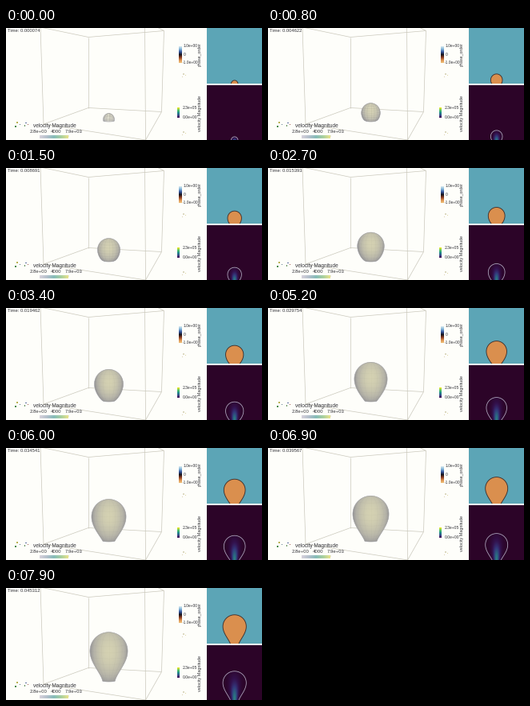
A matplotlib script that plays this animation: 320x141 px, repeating every 8 s.

```python
import numpy as np
import matplotlib.pyplot as plt
from matplotlib.animation import FuncAnimation
from matplotlib.colors import LinearSegmentedColormap
from matplotlib.patches import Polygon, Rectangle

W, H, DPI = 320, 141, 64
FRAMES, STEP_MS = 80, 100
PT = 72 / DPI

PAPER, INK, EDGE = "#fefefa", "#34343a", "#cac8bc"
TEAL, ORANGE, DARK = "#5ca5b6", "#da8f4e", "#2c0428"

plt.rcParams["font.family"] = "Liberation Sans"
fig = plt.figure(figsize=(W / DPI, H / DPI), dpi=DPI, facecolor=PAPER)
ax = fig.add_axes([0, 0, 1, 1])
ax.axis("off")


def cmap(*colors):
    return LinearSegmentedColormap.from_list("ramp", colors)


PHASE = cmap("#f0c27c", ORANGE, "#8a3a20", "#15151c", "#34529a", "#7fb4d8", "#d5e6ee")
SPEED = cmap("#440154", "#3b528b", "#21918c", "#5ec962", "#fde725")
MAGNITUDE = cmap("#d6d2dc", "#b4c0cc", "#86bcba", "#a8d0a0", "#e8e28c")
FLOW = cmap(DARK, "#33124e", "#34367a", "#2b6a82", "#2f9c84", "#7ecb68")
SKIN = cmap("#85858e", "#b5b3a8", "#d4d1b2")


def text(x, y, s, px, **kw):
    opts = dict(color=INK, ha="left", va="center") | kw
    return ax.text(x, y, s, fontsize=px * PT, zorder=9, **opts)


def line(xs, ys, color, px=0.7, **kw):
    return ax.plot(xs, ys, color=color, lw=px * PT, solid_capstyle="butt", **kw)[0]


def bar(x0, x1, y0, y1, ramp, vertical=True):
    g = np.linspace(0, 1, 64)
    g = g[::-1, None] if vertical else g[None, :]
    ax.imshow(g, cmap=ramp, extent=(x0, x1, y1, y0), aspect="auto", zorder=3)


def triad(x, y, r, colors):
    for (dx, dy), c in zip(((1, -0.3), (-0.6, 0.4), (0, -1)), colors):
        ax.add_patch(Rectangle((x + r * dx - 0.6, y + r * dy - 0.6), 1.2, 1.2, fc=c, lw=0))


# Domain box corners: left, back, right, front
top = [(43, -1), (103, 11.5), (197.5, 3.5), (173.5, -9)]
base = [(47, 121), (103, 100.5), (194.5, 105.5), (174.5, 141)]
for k in range(4):
    n = (k + 1) % 4
    for a, b in ((top[k], top[n]), (base[k], base[n]), (top[k], base[k])):
        line([a[0], b[0]], [a[1], b[1]], EDGE, zorder=1)

# Legends
text(34, 123.3, "velocity Magnitude", 6.5)
for x, label in ((30, "2.8e+00"), (56, "4000"), (73.5, "7.9e+03")):
    text(x, 130, label, 6)
bar(42, 78, 135.5, 139, MAGNITUDE, vertical=False)
for x in np.linspace(44, 78, 9):
    line([x, x], [134.5, 135.5], "#a0a090", 0.5)

bar(215.5, 219, 23, 44, PHASE)
text(222, 23, "1.0e+00", 4.9)
text(221.5, 33.3, "0", 4.9)
text(220.5, 43.8, "-1.0e+00", 4.9)
text(242.5, 33, "phase_order", 5.3, rotation=90, ha="center")

bar(214, 217, 100, 113, SPEED)
text(220.5, 100.3, "2.3e+05", 5)
text(220.5, 112.8, "0.0e+00", 5)
text(242.5, 107, "velocity Magnitude", 5.4, rotation=90, ha="center")

for y in (60.5, 133.5):
    triad(222, y, 2.5, ("#e0d9a0", "#dcd0b0", "#dcd8c0"))
triad(14, 122.5, 3.5, ("#5a7a8a", "#4a8a4a", "#b9b050"))
triad(25, 122, 2.5, ("#a05a50", "#5a8a50", "#6070a0"))

# Slice panels
PANELS = ((251, 0, 69, 70), (251, 72, 69, 69))
for (x, y, w, h), color in zip(PANELS, (TEAL, DARK)):
    ax.add_patch(Rectangle((x, y), w, h, fc=color, lw=0, zorder=2))
gx, gy = np.meshgrid(np.arange(251.25, 320, 0.5), np.arange(72.25, 141, 0.5))
flow = ax.imshow(np.zeros_like(gx), cmap=FLOW, vmin=0, vmax=1,
                 extent=(251, 320, 141, 72), aspect="auto", zorder=3)

clock = text(1.5, 3.7, "", 5.85)


def shape(i):
    """Height, half width, foot half width, belly height and taper power."""
    start = np.exp(-i / 4)
    w = np.cbrt(343 + 161 * i)
    h = w * (1.91 + 0.0088 * i - 0.55 * start)
    foot = 8 - 2.5 * np.exp(-i / 30) + 1.3 * start
    mid = h * (0.48 + 0.0017 * i - 0.3 * start)
    power = 0.5 + 0.9 * (i / 79) ** 1.5
    return h, w, foot, mid, power


def width_at(z, h, w, foot, mid, power):
    s = np.clip(z / mid, 0, 1)
    u = np.clip((z - mid) / (h - mid), 0, 1)
    lower = foot + (w - foot) * np.sin(np.pi * s / 2) ** power
    return np.where(z < mid, lower, w * np.sqrt(1 - u ** 2))


def outline(p, cx, cy, scale=1.0, sag=0.0):
    z = p[0] * (1 - np.cos(np.linspace(0, np.pi, 80))) / 2
    r = width_at(z, *p)
    a = np.linspace(0, np.pi, 20)[1:-1]
    x = np.concatenate([r, -r[::-1], -p[2] * np.cos(a)])
    y = np.concatenate([-z, -z[::-1], sag * np.sin(a)])
    return np.column_stack([cx + scale * x, cy + scale * y])


def poly(z, **kw):
    patch = Polygon([(0, 0), (1, 0), (1, 1)], closed=True, zorder=z, **kw)
    return ax.add_patch(patch)


drop = poly(4, fc=ORANGE, ec="#40302c", lw=0.9 * PT)
ring = poly(5, fc="none", ec="#b0a9c0", lw=0.8 * PT)
body = poly(4, fc="none", ec="#97979c", lw=0.5 * PT)
for patch, (x, y, w, h) in zip((drop, ring), PANELS):
    patch.set_clip_path(Rectangle((x, y), w, h, transform=ax.transData))

sx, sy = np.meshgrid(np.linspace(-1, 1, 60), np.linspace(-1, 1, 60))
light = 1 - 0.85 * np.clip(sx ** 2 + 0.6 * (sy + 0.2) ** 2, 0, 1.2)
skin = ax.imshow(light, cmap=SKIN, vmin=0, vmax=1, aspect="auto", zorder=3)
skin.set_clip_path(body)
mesh = [line([], [], "#77756f", 0.5, zorder=4) for _ in range(14)]

ax.set_xlim(0, W)
ax.set_ylim(H, 0)


def draw_mesh(i, cx, cy, p):
    z = np.linspace(0, p[0], 40)
    r = width_at(z, *p)
    a = np.linspace(0, np.pi, 24)
    for k, ln in enumerate(mesh):
        if k < 7:
            ln.set_data(cx + r * np.sin((k - 3) * np.pi / 8), cy - z)
        else:
            zk = p[0] * (k - 6) / 8
            rk = width_at(zk, *p)
            ln.set_data(cx + rk * np.cos(a), cy - zk + 0.12 * rk * np.sin(a))
        ln.set_alpha(0.06 + 0.3 * np.exp(-i / 8))
        ln.set_clip_path(body)


def draw(i):
    clock.set_text(f"Time: {0.000074 + 0.000239354 * (12 * i // 5):.6f}")
    p = shape(i)
    h, w = p[:2]
    cx, cy = 128.5, 117

    body.set_xy(outline(p, cx, cy, sag=1))
    skin.set_extent((cx - w - 1, cx + w + 1, cy + 2, cy - h - 1))
    skin.set_alpha(1 - 0.5 * np.exp(-i / 4))
    draw_mesh(i, cx, cy, p)

    sx0, foot_y, scale = 285.7, 71.8, 0.62
    drop.set_xy(outline(p, sx0, foot_y, scale))
    ring.set_xy(outline(p, sx0, foot_y + 71, scale))

    # Jet rising from the inlet, confined to the bubble
    up = (foot_y + 71 - gy) / scale
    dx = np.abs(gx - sx0) / scale
    room = width_at(np.clip(up, 0, h), *p)
    inside = (up < h) / (1 + np.exp(np.clip((dx - room) * 1.5, -30, 30)))
    spread = 3.4 + 0.1 * up
    jet = 0.58 * np.exp(-(dx / spread) ** 2 / 2 - (up / (0.65 * h)) ** 2)
    halo = 0.12 * np.exp(-(dx / (0.55 * w)) ** 2 - (up / (0.75 * h)) ** 2)
    flow.set_data((jet + halo) * inside)
    return []


anim = FuncAnimation(fig, draw, frames=FRAMES, init_func=lambda: draw(0),
                     interval=STEP_MS, repeat=True, repeat_delay=0)
plt.show()
```
